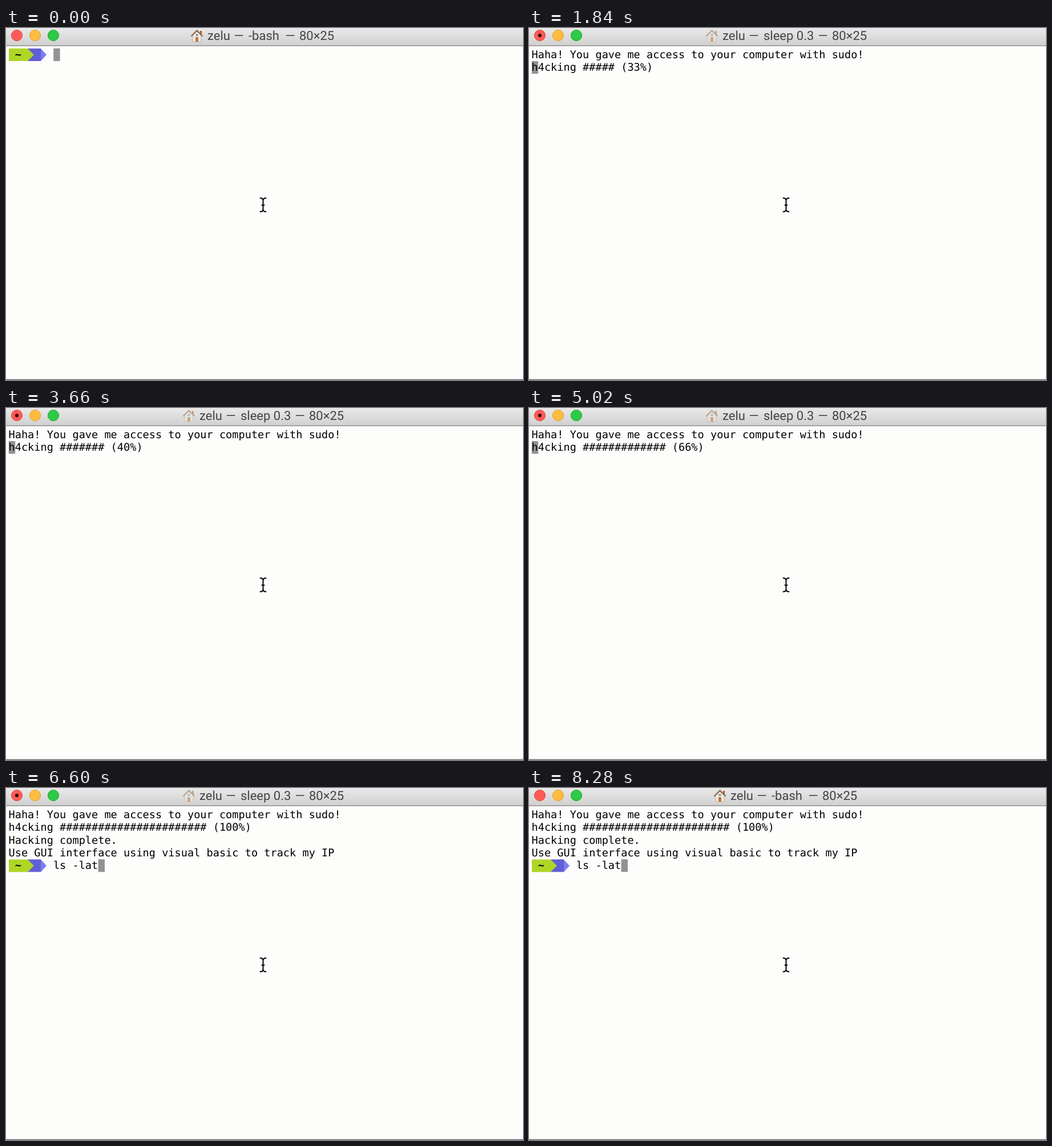
An HTML page for the animation above (8300 ms loop, 906x618 px).

```html
<!DOCTYPE html>
<html lang="en">
<head>
<meta charset="utf-8">
<title>Terminal</title>
<style>
  html, body { margin: 0; width: 100%; height: 100%; overflow: hidden; background: #fdfdfc; }
  svg { display: block; width: 906px; height: 618px; }
  text { white-space: pre; text-rendering: geometricPrecision; }
  .title { font: 22px Roboto, Inter, sans-serif; fill: #444; }
  .dash { text-anchor: middle; }
  .term { font: 18.6px "DejaVu Sans Mono", "Liberation Mono", monospace; fill: #000; }
  .bold { font-weight: bold; }
</style>
</head>
<body>
<svg viewBox="0 0 906 618">
  <defs>
    <linearGradient id="bar" x1="0" y1="0" x2="0" y2="1">
      <stop offset="0" stop-color="#e9e9e9"/>
      <stop offset="1" stop-color="#d0d0d0"/>
    </linearGradient>
  </defs>
  <rect width="906" height="618" fill="#fdfdfc"/>
  <rect width="906" height="31" fill="url(#bar)"/>
  <rect y="30.5" width="906" height="1.3" fill="#858585"/>
  <rect y="616.5" width="906" height="1.5" fill="#7c7c80"/>

  <g stroke-width="1">
    <circle cx="19" cy="13" r="9.6" fill="#fc5b57" stroke="#df4744"/>
    <circle cx="51" cy="13" r="9.6" fill="#fdbc40" stroke="#dea035"/>
    <circle cx="83" cy="13" r="9.6" fill="#2ec946" stroke="#1fab32"/>
  </g>
  <circle id="dot" cx="19" cy="13" r="3.1" fill="#3c0503"/>

  <g id="heading">
    <g id="house">
      <path d="M340 5h3v8h-3z" fill="#a65f38"/>
      <path d="M327 13 334.5 6 342 13V24H327z" fill="#f0ece2" stroke="#aaa294" stroke-width=".8"/>
      <path d="M324.5 14.5 334.5 4.5 344.5 14.5" fill="none" stroke="#966b48" stroke-width="2.4"/>
      <path d="M332 16h5v8h-5z" fill="#bd763c"/>
      <path d="M332.5 10.5h4v3.5h-4z" fill="#7b98ac"/>
    </g>
    <text class="title" x="353" y="21">zelu</text>
    <text class="title dash" x="408" y="21">—</text>
    <text class="title" id="job" x="425" y="21"></text>
  </g>
  <g id="size">
    <text class="title dash" x="498" y="21">—</text>
    <text class="title" x="514" y="21">80×25</text>
  </g>

  <rect id="cursor" width="11.4" height="22.2" fill="#929292"/>
  <g id="prompt">
    <path d="M38 36H61V58H38z" fill="#5f5fd7"/>
    <path d="M61 36 71 47 61 58z" fill="#7d7df2"/>
    <path d="M5 36H38L49 47 38 58H5z" fill="#aed625"/>
    <text class="term bold" x="15.7" y="53">~</text>
    <text class="term" id="typed" x="82.9" y="53"></text>
  </g>
  <g id="lines"></g>

  <g fill="none" stroke-linecap="round">
    <g id="beam">
      <path d="M445.5 298.5Q450.5 298.5 450.5 303Q450.5 298.5 455.5 298.5M450.5 303V318M445.5 322.5Q450.5 322.5 450.5 318Q450.5 322.5 455.5 322.5M448.5 311H452.5" stroke="#000" stroke-width="2"/>
    </g>
  </g>
</svg>
<script>
const LOOP = 8300;
const COL = 11.2, ROW = 22.35;
const $ = id => document.getElementById(id);

const greeting = "Haha! You gave me access to your computer with sudo!";
const progress = (count, percent) => [greeting, `h4cking ${"#".repeat(count)} (${percent}%)`];
const finished = [...progress(23, 100), "Hacking complete.",
  "Use GUI interface using visual basic to track my IP"];

// start time, process running, output lines, prompt shown, typed command
const steps = [
  [0, false, [], true, ""],
  [680, true, progress(2, 10), false, ""],
  [1820, true, progress(5, 33), false, ""],
  [2920, true, progress(7, 40), false, ""],
  [4060, true, progress(13, 66), false, ""],
  [5160, true, progress(23, 100), false, ""],
  [6420, true, finished, true, "ls -lat"],
  [6700, false, finished, true, "ls -lat"]
];

const rows = finished.map((_, i) => {
  const row = document.createElementNS("http://www.w3.org/2000/svg", "text");
  row.setAttribute("class", "term");
  row.setAttribute("x", 4.5);
  row.setAttribute("y", 53 + i * ROW);
  $("lines").append(row);
  return row;
});

const show = (id, on) => $(id).setAttribute("visibility", on ? "visible" : "hidden");
const move = (id, x, y) => $(id).setAttribute("transform", `translate(${x} ${y})`);

function render([, running, lines, prompt, typed]) {
  show("dot", running);
  $("house").setAttribute("opacity", running ? 0.5 : 1);
  $("job").textContent = running ? "sleep 0.3" : "-bash";
  move("heading", running ? -14 : 0, 0);
  move("size", running ? 17 : 0, 0);

  rows.forEach((row, i) => row.textContent = lines[i] || "");
  show("prompt", prompt);
  move("prompt", 0, lines.length * ROW);
  $("typed").textContent = typed;

  const col = prompt ? 7 + typed.length : 0;
  const line = prompt ? lines.length : 1;
  move("cursor", 4.8 + col * COL, 35.8 + line * ROW);
}

let current;
const begin = performance.now();
function tick() {
  const time = (performance.now() - begin) % LOOP;
  const step = steps.findLast(s => s[0] <= time);
  if (step !== current) render(current = step);
  requestAnimationFrame(tick);
}
tick();
</script>
</body>
</html>
```
